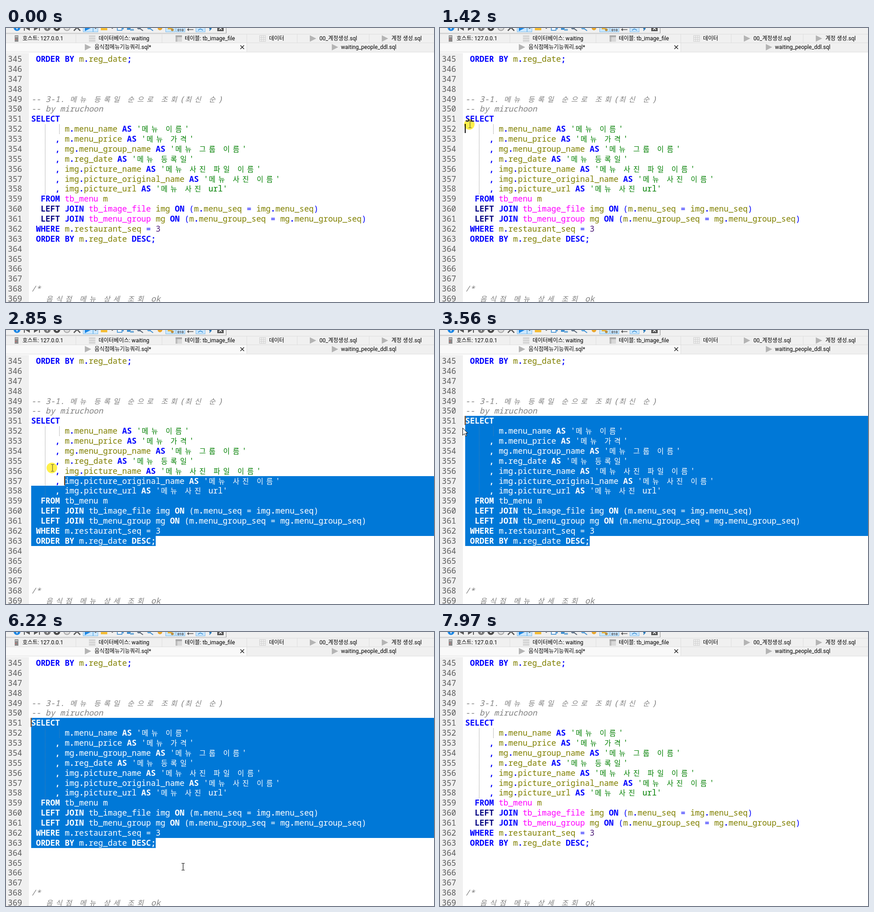
An HTML page with a canvas for the animation above (8 s loop, 934 by 600 pixels).

```html
<!DOCTYPE html>
<html lang="ko">
<head>
<meta charset="utf-8">
<style>
html, body { margin: 0; width: 100%; height: 100%; overflow: hidden; background: #fff; }
canvas { display: block; }
</style>
</head>
<body>
<canvas id="stage" width="934" height="600"></canvas>
<script>
const ctx = document.getElementById('stage').getContext('2d');
const LOOP = 8000, STEP = 66.7;
const LEFT = 55, COL = 10.45, TOP = 57.1, ROW = 21.875;
const MONO = '17.4px "Noto Sans Mono", monospace';
const HANGUL = '15.5px "Noto Sans CJK KR", sans-serif';
const UI = '12px Roboto, "Noto Sans CJK KR", sans-serif';

const lines = ` ORDER BY m.reg_date;



-- 3-1. 메뉴 등록일 순으로 조회(최신 순)
-- by miruchoon
SELECT
       m.menu_name AS '메뉴 이름'
     , m.menu_price AS '메뉴 가격'
     , mg.menu_group_name AS '메뉴 그룹 이름'
     , m.reg_date AS '메뉴 등록일'
     , img.picture_name AS '메뉴 사진 파일 이름'
     , img.picture_original_name AS '메뉴 사진 이름'
     , img.picture_url AS '메뉴 사진 url'
  FROM tb_menu m
  LEFT JOIN tb_image_file img ON (m.menu_seq = img.menu_seq)
  LEFT JOIN tb_menu_group mg ON (m.menu_group_seq = mg.menu_group_seq)
 WHERE m.restaurant_seq = 3
 ORDER BY m.reg_date DESC;




/*
   음식점 메뉴 상세 조회 ok`.split('\n');

// Mouse paths: [time, x, y]; each path starts with a jump and holds its last point.
const paths = [
  [[0, -99, -99]],
  [[190, 839, 590], [410, 359, 449]],
  [[610, 359, 455], [953, 129, 305], [1020, 107, 291], [1350, 65, 217]],
  [[1420, 64, 211], [1620, 56, 199]],
  [[1890, 70, 212], [2360, 330, 454]],
  [[2500, 330, 455], [2780, 129, 328], [2850, 100, 302], [3200, 41, 205]],
  [[3490, 44, 209], [3560, 49, 214]],
  [[4150, 120, 165], [4283, 465, 4]],
  [[4350, -99, -99]],
  [[4740, 56, 250], [5350, 330, 620]],
  [[6150, 386, 526], [6220, 386, 514], [6290, 388, 508]],
  [[6440, -99, -99]],
];
// Selection drags: press time, release time, anchor row, anchor column.
const drags = [[610, 1420, 18, 26], [1420, 1890, 7, 0], [2500, 3490, 18, 26]];
const DESELECT = 6290;
const caretOff = [[0, 610], [1950, 2500], [3820, 4880], [5350, 5880], [6840, 7440], [7970, LOOP]];

const within = (t, spans) => spans.some(([a, b]) => t >= a && t < b);
const colX = col => LEFT + col * COL;
const rowY = row => TOP + row * ROW;
const isWide = ch => ch >= '가' && ch <= '힣';

function box(x, y, w, h, fill) {
  ctx.fillStyle = fill;
  ctx.fillRect(x, y, w, h);
}
function poly(points, fill, stroke) {
  ctx.beginPath();
  points.forEach(([x, y]) => ctx.lineTo(x, y));
  ctx.closePath();
  if (fill) { ctx.fillStyle = fill; ctx.fill(); }
  if (stroke) { ctx.strokeStyle = stroke; ctx.lineWidth = 1; ctx.stroke(); }
}
function line(x1, y1, x2, y2, color, width = 1) {
  ctx.strokeStyle = color;
  ctx.lineWidth = width;
  ctx.beginPath();
  ctx.moveTo(x1, y1);
  ctx.lineTo(x2, y2);
  ctx.stroke();
}
function disc(x, y, r, fill) {
  ctx.fillStyle = fill;
  ctx.beginPath();
  ctx.arc(x, y, r, 0, 7);
  ctx.fill();
}
function label(text, x, y, font = UI, color = '#000') {
  ctx.font = font;
  ctx.fillStyle = color;
  ctx.fillText(text, x, y);
}

function mouseAt(t) {
  const path = paths.findLast(p => p[0][0] <= t);
  const i = path.findLastIndex(k => k[0] <= t);
  const [t0, x0, y0] = path[i];
  if (i === path.length - 1) return [x0, y0];
  const [t1, x1, y1] = path[i + 1];
  const f = Math.floor((t - t0) / STEP) * STEP / (t1 - t0);
  return [x0 + (x1 - x0) * f, y0 + (y1 - y0) * f];
}

function tokenStyle(token) {
  if (/^(--|\/\*)/.test(token)) return ['italic ', '#808080'];
  if (token[0] === "'") return ['', '#008000'];
  if (token === 'LEFT') return ['bold ', '#000080'];
  if (/^[A-Z]+$/.test(token)) return ['bold ', '#0000ff'];
  if (/^tb_/.test(token)) return ['', '#ff00ff'];
  if (/^\d/.test(token)) return ['', '#4b1a78'];
  if (/^\w/.test(token)) return ['', '#808000'];
  return [/[.,;]/.test(token) ? 'bold ' : '', '#0000ff'];
}

function drawCode(selected) {
  ctx.setLineDash([1, 1]);
  const guide = selected ? '#4a7fae' : '#808080';
  line(85.5, 211, 85.5, 364, guide);
  line(116.5, 211, 116.5, 233, guide);
  ctx.setLineDash([]);
  lines.forEach((text, row) => {
    let col = 0;
    const tokens = text.match(/--.*|\/\*|'[^']*'|\w+|\s+|[^\w\s]/g) || [];
    for (const token of tokens) {
      const [style, color] = tokenStyle(row > 23 ? '--' : token);
      ctx.fillStyle = selected ? '#fff' : color;
      for (const ch of token) {
        const wide = isWide(ch);
        ctx.font = style + (wide ? HANGUL : MONO);
        if (ch !== ' ') ctx.fillText(ch, colX(col) + (wide ? 1 : 0), rowY(row) + 17);
        col += wide ? 2 : 1;
      }
    }
  });
}

function drawToolbar() {
  box(0, 0, 934, 55, '#f0f0f0');
  const dark = '#555', blue = '#1e88e5';
  line(0, 11.5, 481, 11.5, '#b4b4b4');
  line(480.5, 0, 480.5, 11, '#909090');
  disc(24, -1, 7.5, blue);
  box(23, 0, 2, 3, '#fff');
  box(39, 0, 2, 6, dark);
  poly([[52, -6], [52, 6], [42, 0]], dark);
  poly([[61, -6], [61, 6], [71, 0]], dark);
  box(72, 0, 2, 6, dark);
  disc(90, -1, 7.5, '#777');
  box(89, 0, 2, 3, '#eee');
  disc(111, -1, 7.5, '#4a4a4a');
  box(109, 0, 4, 2, '#eee');
  disc(133, -1, 7.5, '#a5a5a5');
  disc(133, -1, 5.5, '#ddd');
  line(148, 6, 155, -1, dark, 2.5);
  line(162, 6, 155, -1, dark, 2.5);

  for (const [x, w] of [[168, 22], [190, 11], [348, 22], [371, 20], [414, 21]]) {
    box(x, -1, w, 10, '#cce8ff');
    ctx.strokeStyle = '#7fbdea';
    ctx.lineWidth = 1;
    ctx.strokeRect(x + .5, -1, w - 1, 9.5);
  }
  poly([[172, -7], [172, 7], [185, 0]], blue);
  poly([[193, 0], [198, 0], [195.5, 2]], dark);
  box(207, 0, 14, 5, '#f5bd35');
  poly([[230, 0], [234, 0], [232, 2]], dark);
  box(242, 0, 12, 6, '#5b9fd8');
  box(244, 0, 8, 4, '#fff');
  box(253, 0, 4, 3, '#5b9fd8');
  box(264, 0, 8, 4, '#3d8fd1');
  box(271, 2, 8, 4, '#78aed8');
  disc(290, -1, 4, '#607890');
  line(292, 1, 299, 6, '#536070', 2);
  disc(312, -1, 4, '#59a5df');
  line(314, 1, 321, 6, '#3d8fd1', 2);
  disc(336, 0, 5, '#eaa72b');
  box(353, 0, 9, 3, '#eab53a');
  disc(363, 4, 3, '#ba8f42');
  label('010', 374, 7, 'bold 8px Roboto, sans-serif', '#333');
  line(396, 3.5, 409, 3.5, dark, 1.5);
  poly([[399, 0], [399, 7], [395, 3.5]], dark);
  line(419, 5, 424, 2, '#3d8fd1', 1.5);
  line(424, 2, 430, 5, '#3d8fd1', 1.5);
  disc(446, 1, 2.5, '#2878b8');
  line(448, 1, 444, 6, '#2878b8', 1.5);
  box(461, -1, 14, 8, '#555');
  line(465, 4, 468, 0, '#fff', 1.5);
  line(471, 4, 468, 0, '#fff', 1.5);
}

function drawTabs() {
  box(0, 33, 525, 20, '#f9f9f9');
  line(0, 13.5, 934, 13.5, '#dedede');
  line(0, 32.5, 934, 32.5, '#dedede');
  line(0, 52.5, 934, 52.5, '#e2e2e2');
  for (const x of [152, 340, 525, 635, 792]) line(x + .5, 14, x + .5, 32, '#dedede');
  line(525.5, 33, 525.5, 52, '#dedede');
  box(0, 53, 934, 2, '#fafafa');

  box(19, 16, 8, 14, '#8a8a8a');
  box(20, 18, 6, 2, '#ccc');
  box(20, 24, 3, 2, '#c96a6a');
  for (let i = 0; i < 3; i++) box(181, 16 + i * 5, 14, 4, '#d5d5d5');
  box(370, 16, 14, 14, '#d8d8d8');
  box(370, 16, 14, 4, '#aaa');
  box(370, 20, 4, 10, '#bbb');
  for (let i = 0; i < 4; i++) {
    line(553, 16.5 + i * 4.3, 567, 16.5 + i * 4.3, '#cfcfcf');
    line(553.5 + i * 4.3, 16, 553.5 + i * 4.3, 30, '#cfcfcf');
  }
  for (const [x, y] of [[663, 23], [820, 23], [172, 42], [711, 42]])
    poly([[x, y - 7], [x, y + 7], [x + 14, y]], '#b4b4b4');

  label('호스트: 127.0.0.1', 36, 27);
  label('데이터베이스: waiting', 202, 27);
  label('테이블: tb_image_file', 390, 27);
  label('데이터', 574, 27);
  label('00_계정생성.sql', 684, 27);
  label('계정 생성.sql', 841, 27);
  label('음식점메뉴기능쿼리.sql*', 193, 46);
  label('waiting_people_ddl.sql', 731, 46);
  line(511.5, 38, 519.5, 46, '#222', 1.5);
  line(519.5, 38, 511.5, 46, '#222', 1.5);
}

function drawGutter() {
  box(0, 55, 50, 545, '#f0f0f0');
  lines.forEach((_, row) => label(345 + row, 4, rowY(row) + 17, MONO, '#5c5c5c'));
}

function caretAt(t) {
  const drag = drags.findLast(d => d[0] <= t);
  if (!drag || t >= DESELECT) return { row: 20, col: 0 };
  const [start, end, anchorRow, anchorCol] = drag;
  const [x, y] = mouseAt(Math.max(start, Math.min(t - 60, end - 1)));
  const row = Math.min(anchorRow, Math.floor((y - TOP) / ROW));
  const col = Math.max(0, Math.min(lines[row].length, Math.floor((x - LEFT) / COL)));
  return { row, col, anchorRow, anchorCol };
}

function drawSelection({ row, col, anchorRow, anchorCol }) {
  ctx.save();
  ctx.beginPath();
  for (let r = row; r <= anchorRow; r++) {
    const x = colX(r === row ? col : 0);
    const right = r === anchorRow ? colX(anchorCol) : 934;
    const y = Math.round(rowY(r));
    ctx.rect(x, y, Math.max(0, right - x), Math.round(rowY(r + 1)) - y);
  }
  ctx.clip();
  box(0, 0, 934, 600, '#0078d7');
  drawCode(true);
  ctx.restore();
}

function drawMouse(t) {
  const [x, y] = mouseAt(t);
  const pressed = within(t, [[610, 1890], [2500, 3490], [6290, 6440]]);
  if (pressed) {
    ctx.globalCompositeOperation = 'multiply';
    disc(x, y, 11.5, '#fff04a');
    ctx.globalCompositeOperation = 'source-over';
  }
  if (x < 52 || y < 55) {
    const shape = [[0, 0], [0, 16], [4, 12.5], [6.5, 18], [9, 17], [6.5, 11.5], [11, 11.5]];
    poly(shape.map(([dx, dy]) => [x + dx + .5, y + dy + .5]), '#fff', '#000');
  } else {
    const color = pressed ? '#6e6a38' : '#222';
    const cx = Math.round(x) + (pressed ? 1.5 : .5), cy = Math.round(y);
    line(cx, cy - 7, cx, cy + 8, color, 1.3);
    for (const dy of [-7.5, 7.5]) line(cx - 3.5, cy + dy, cx + 3.5, cy + dy, color);
  }
}

function draw(t) {
  box(0, 0, 934, 600, '#fff');
  drawToolbar();
  drawTabs();
  drawGutter();
  drawCode(false);
  const caret = caretAt(t);
  if (caret.anchorRow) drawSelection(caret);
  if (!within(t, caretOff)) {
    ctx.globalCompositeOperation = 'difference';
    box(Math.round(colX(caret.col)) - 1, Math.round(rowY(caret.row)), 2, 20, '#fff');
    ctx.globalCompositeOperation = 'source-over';
  }
  drawMouse(t);
}

const start = performance.now();
function tick() {
  draw((performance.now() - start) % LOOP);
  requestAnimationFrame(tick);
}
tick();
</script>
</body>
</html>
```
